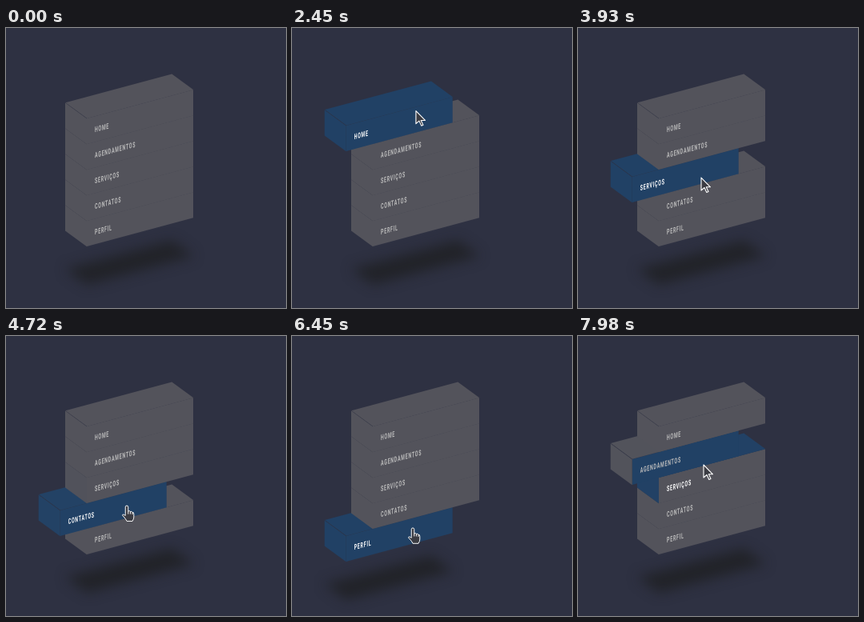
Animation, 350 px wide and 350 px high, one loop 8 s. Source, as an HTML page:

```html
<!DOCTYPE html>
<html lang="pt">
<head>
<meta charset="utf-8">
<title>Menu isométrico</title>
<style>
  html, body { margin: 0; width: 100%; height: 100%; overflow: hidden; background: #2e3142; }
  ul {
    position: absolute; left: 101px; top: 113px; width: 133px;
    margin: 0; padding: 0; list-style: none;
    transform: skewY(-15deg); transform-origin: 0 0;
  }
  li {
    --on: 0; --fade: 0;
    position: relative; height: 32px;
    transform: translateX(calc(var(--on) * -33.33px));
    background: color-mix(in srgb, #53535b, #214165 calc(var(--on) * 100%));
  }
  .side, .top {
    position: absolute;
    background: color-mix(in srgb, #53535b, #214165 calc(var(--fade) * 100%));
  }
  .side {
    left: -26.67px; top: 0; width: 26.67px; height: 100%;
    transform: skewY(45deg); transform-origin: right;
  }
  .top {
    left: 0; top: -26.67px; width: 100%; height: 26.67px;
    transform: skewX(45deg); transform-origin: bottom;
  }
  li:last-child .top { box-shadow: -80px 80px 13.3px rgba(32, 33, 36, .85); }
  .label {
    position: absolute; left: 10px; top: .5px;
    font: 700 9.6px/32px Roboto, sans-serif; letter-spacing: 1.4px;
    color: color-mix(in srgb, #bcbcbc, #fff calc(var(--fade) * 100%));
    white-space: nowrap;
    transform: scaleX(.55); transform-origin: 0 0;
  }
  svg { position: absolute; z-index: 9; left: 0; top: 0; width: 1px; height: 1px; overflow: visible; }
  path { stroke: #fff; stroke-width: 1.1; stroke-linejoin: round; fill: #3b3c43; }
</style>
</head>
<body>
<ul></ul>
<svg id="cursor">
  <path id="arrow" d="M0 0V16L4 12.5L6.8 18.5L9 17.5L6.3 11.8H11.5Z"/>
  <g id="hand" transform="scale(.88)">
    <path d="M-2 12V2Q-2 0 0 0T2 2V8Q4 6.5 5 8.5Q7 7.5 8 9.5Q10 9 10 12V16Q10 19 8 22H0Q-1 19-6 14Q-6.5 11-2 14Z"/>
    <path d="M2 8V12M5 8.5V12M8 9.5V12.5" fill="none"/>
  </g>
</svg>
<script>
const LOOP = 8000, ENTER = 950, FADE = 500;
const ROW = 32, DEPTH = 26.67, SLOPE = Math.tan(Math.PI / 12);
const names = ['HOME', 'AGENDAMENTOS', 'SERVIÇOS', 'CONTATOS', 'PERFIL'];

// key points of the pointer: time, x, y
const path = [
  [ENTER, 168, -18], [1740, 157, 59], [3110, 153, 145], [3930, 154, 187],
  [4350, 153, 194], [4720, 151, 212], [5250, 151, 246], [5710, 151, 240],
  [6450, 151, 240], [7180, 154, 194], [7980, 157, 161]
];

const clamp = v => Math.min(1, Math.max(0, v));

// close to the CSS "ease" curve
function ease(x) {
  const u = 1 - (1 - clamp(x)) ** 1.8;
  return u * u * (3 - 2 * u);
}

function pointer(t) {
  const i = Math.max(1, path.findIndex(p => p[0] > t));
  const last = t >= path[path.length - 1][0];
  const [a, b] = last ? path.slice(-2) : [path[i - 1], path[i]];
  const k = clamp((t - a[0]) / (b[0] - a[0]));
  return { x: a[1] + (b[1] - a[1]) * k, y: a[2] + (b[2] - a[2]) * k };
}

// height of the pointer on the slanted front face
function frontY(t) {
  const { x, y } = pointer(t);
  return y - 113 + SLOPE * (x - 101);
}

// the top face belongs to the first row
function rowAt(t) {
  const y = frontY(t);
  return y < -DEPTH ? -1 : Math.max(0, Math.floor(y / ROW));
}

function overLabel(t) {
  const y = frontY(t);
  return y > 0 && Math.abs(y % ROW - ROW / 2) < 6;
}

// spans of time in which one row is hovered
const spans = [];
for (let t = ENTER; t < LOOP; t += 4) {
  const row = rowAt(t), prev = spans[spans.length - 1];
  if (prev && prev.row === row) prev.to = t + 4;
  else spans.push({ row, from: t, to: t + 4 });
}

function box(parent, tag, name) {
  const el = document.createElement(tag);
  if (name) el.className = name;
  parent.append(el);
  return el;
}

const menu = document.querySelector('ul');
const items = names.map((name, i) => {
  const li = box(menu, 'li');
  li.style.zIndex = names.length - i;
  box(li, 'div', 'side');
  box(li, 'div', 'top');
  box(li, 'span', 'label').textContent = name;
  return li;
});

const cursor = document.getElementById('cursor');
const arrow = document.getElementById('arrow');
const hand = document.getElementById('hand');

function draw(t) {
  items.forEach((li, row) => {
    let on = 0, fade = 0;
    for (const s of spans) {
      if (s.row !== row) continue;
      if (t >= s.from && t < s.to) on = 1;
      fade = Math.max(fade, ease((t - s.from) / FADE) * (1 - ease((t - s.to) / FADE)));
    }
    li.style.setProperty('--on', on);
    li.style.setProperty('--fade', fade.toFixed(4));
  });

  const { x, y } = pointer(t), isHand = overLabel(t);
  cursor.style.transform = `translate(${x}px, ${y}px)`;
  cursor.style.visibility = t < ENTER ? 'hidden' : 'visible';
  arrow.style.opacity = isHand ? 0 : 1;
  hand.style.opacity = isHand ? 1 : 0;
}

const start = performance.now();
function tick() {
  draw((performance.now() - start) % LOOP);
  requestAnimationFrame(tick);
}
tick();
</script>
</body>
</html>
```
